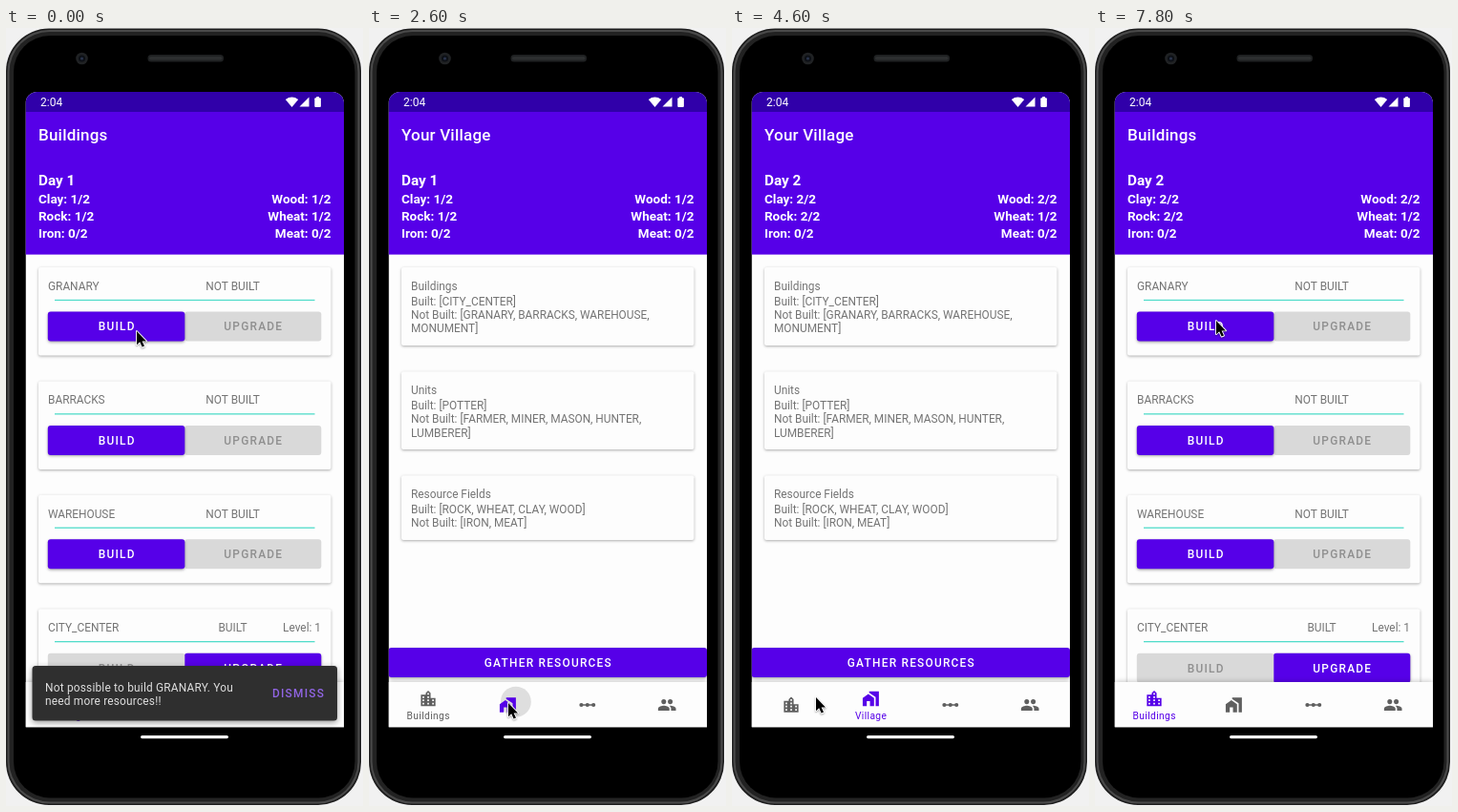
An HTML page with a canvas for the animation above (8 s loop, 374 px wide and 816 px high).

```html
<!DOCTYPE html>
<html lang="en">
<head>
<meta charset="utf-8">
<title>Village builder</title>
<style>
  html, body { margin: 0; width: 100%; height: 100%; overflow: hidden; background: #f1f1f1; }
  canvas { display: block; width: 374px; height: 816px; }
</style>
</head>
<body>
<canvas id="stage"></canvas>
<script>
const LOOP = 8000, STEP = 200;
const DISMISSED = 1400, VILLAGE_TAP = 2600, GATHERED = 3800, BUILDINGS_TAP = 5800;
const PURPLE = '#5600e8', GREY = '#5f5f5f', PAPER = '#fdfdfd', BODY = '#747474';
const LEFT = 20.5, WIDTH = 333.5, TOP = 67, BOTTOM = 733.5;

const canvas = document.getElementById('stage');
const scale = window.devicePixelRatio || 1;
canvas.width = 374 * scale;
canvas.height = 816 * scale;
const ctx = canvas.getContext('2d');

const clamp = v => Math.max(0, Math.min(1, v));
const ease = v => v * v * (3 - 2 * v);
const mix = (a, b, p) => a + (b - a) * p;

function box(x, y, w, h, radius, fill) {
  ctx.beginPath();
  ctx.roundRect(x, y, w, h, radius);
  ctx.fillStyle = fill;
  ctx.fill();
}

function disc(x, y, r, fill) {
  ctx.beginPath();
  ctx.arc(x, y, r, 0, 7);
  ctx.fillStyle = fill;
  ctx.fill();
}

function shadowed(blur, dy, alpha, draw) {
  ctx.save();
  ctx.shadowColor = `rgba(0,0,0,${alpha})`;
  ctx.shadowBlur = blur * scale;
  ctx.shadowOffsetY = dy * scale;
  draw();
  ctx.restore();
}

function text(str, x, y, { size = 11.87, weight = 400, color = BODY, spacing = 0, align = 'left' } = {}) {
  ctx.font = `${weight} ${size}px Roboto, sans-serif`;
  ctx.letterSpacing = spacing + 'px';
  ctx.textAlign = align;
  ctx.fillStyle = color;
  ctx.fillText(str, x + (align === 'left' ? 0 : align === 'center' ? spacing / 2 : spacing), y);
}

function drawPhone() {
  ctx.fillStyle = '#f1f1f1';
  ctx.fillRect(0, 0, 374, 816);
  box(0, 0.5, 372, 814.5, 45, '#1c1c1c');
  box(1.5, 2, 369, 811.5, 44, '#4a4a4a');
  box(3.5, 4, 365, 807.5, 42, '#222');
  box(8, 8, 357.5, 799.5, 38, '#000');
  box(148.5, 28, 79.5, 7.5, 3.5, '#1f2122');
  box(150, 30, 76.5, 3.5, 2, '#2d2f30');
  disc(79.5, 32, 6.3, '#202224');
  disc(79.5, 32, 3.6, '#0d1016');
  disc(79.5, 32, 1.6, '#28324a');
  box(141, 742, 92, 3.2, 1.6, '#f4f4f4');
}

function drawStatusBar() {
  ctx.fillStyle = '#3000a9';
  ctx.fillRect(LEFT, TOP, WIDTH, 21);
  text('2:04', 36, 82, { size: 12, color: '#fff' });
  ctx.fillStyle = '#fff';
  ctx.fill(new Path2D('M299.5 83L292.8 75Q299.5 70.2 306.2 75Z'));
  ctx.fill(new Path2D('M307.5 82.5H317.5V72.5Z'));
  box(323.3, 73.2, 6.6, 9.8, 1, '#fff');
  box(325.2, 72, 2.8, 2, 0, '#fff');
}

function drawHeader(title, gathered) {
  ctx.fillStyle = PURPLE;
  ctx.fillRect(LEFT, 88, WIDTH, 149.6);
  text(title, 34, 118, { size: 17, weight: 500, color: '#fff', spacing: 0.2 });
  const bold = { size: 13.5, weight: 700, color: '#fff' };
  const n = gathered ? 2 : 1;
  text(`Day ${n}`, 34, 165, { ...bold, size: 15.3 });
  [[`Clay: ${n}/2`, `Wood: ${n}/2`], [`Rock: ${n}/2`, 'Wheat: 1/2'], ['Iron: 0/2', 'Meat: 0/2']]
    .forEach(([left, right], i) => {
      const y = 184 + i * 18.2;
      text(left, 34, y, bold);
      text(right, 340.5, y, { ...bold, align: 'right' });
    });
}

function card(y, h) {
  shadowed(3, 1, 0.32, () => box(34, y, 306.5, h, 2, PAPER));
}

function button(label, x, y, w, h, enabled) {
  const draw = () => box(x, y, w, h, 3, enabled ? PURPLE : '#d9d9d9');
  enabled ? shadowed(3, 1.2, 0.35, draw) : draw();
  text(label, x + w / 2, y + h / 2 + 4.3,
    { size: 11.87, weight: 500, spacing: 1.25, align: 'center', color: enabled ? '#fff' : '#8f8f8f' });
}

function drawBuildings() {
  ['GRANARY', 'BARRACKS', 'WAREHOUSE', 'CITY_CENTER'].forEach((name, i) => {
    const y = 251 + i * 119.4, built = i === 3;
    card(y, 92.5);
    text(name, 44, y + 24);
    text(built ? 'BUILT' : 'NOT BUILT', 237.5, y + 24, { align: 'center' });
    if (built) text('Level: 1', 330, y + 24, { align: 'right' });
    ctx.fillStyle = '#52dcca';
    ctx.fillRect(51, y + 33.8, 272.5, 1.3);
    button('UPGRADE', 187, y + 46.5, 143.3, 31, built);
    button('BUILD', 43.8, y + 46.5, 143.5, 31, !built);
  });
}

function drawVillage() {
  const sections = [
    [251, 82, 'Buildings', 'Built: [CITY_CENTER]', 'Not Built: [GRANARY, BARRACKS, WAREHOUSE,', 'MONUMENT]'],
    [360.3, 81.7, 'Units', 'Built: [POTTER]', 'Not Built: [FARMER, MINER, MASON, HUNTER,', 'LUMBERER]'],
    [469.3, 67.7, 'Resource Fields', 'Built: [ROCK, WHEAT, CLAY, WOOD]', 'Not Built: [IRON, MEAT]']
  ];
  for (const [y, h, title, ...lines] of sections) {
    card(y, h);
    text(title, 44, y + 23.8);
    lines.forEach((line, i) => text(line, 44, y + 40 + i * 14.1));
  }
  button('GATHER RESOURCES', LEFT, 650, WIDTH, 31, true);
}

// Icon shapes live on a 24-unit grid.
const holes = corners => corners.map(([x, y]) => `M${x} ${y}v2h2v-2z`).join('');
const circle = (x, y, r) => `M${x - r} ${y}a${r} ${r} 0 0 1 ${2 * r} 0a${r} ${r} 0 0 1 ${-2 * r} 0z`;
const icons = [
  'M15 11V5l-3-3-3 3v2H3v14h18V11z' +
    holes([[5, 9], [5, 13], [5, 17], [11, 5], [11, 9], [11, 13], [11, 17], [17, 13], [17, 17]]),
  'M2 21V11l7-5 7 5v10h-5v-6H7v6zM10 3h12v18h-4V10l-8-5.5z',
  'M4 11h16v2H4z' + [4.5, 12, 19.5].map(x => circle(x, 12, 2.5)).join(''),
  circle(8, 8, 3) + circle(16, 8, 3) +
    'M8 13c-2.3 0-7 1.2-7 3.5V19h14v-2.5c0-2.3-4.7-3.5-7-3.5z' +
    'M16 13l-1 .1c1.2.8 2 1.9 2 3.4V19h6v-2.5c0-2.3-4.7-3.5-7-3.5z'
].map(d => new Path2D(d));
const labels = ['Buildings', 'Village'];
const tabX = i => 62 + i * 83.4;

function drawNav(active, age) {
  shadowed(5, -1, 0.2, () => box(LEFT, 686, WIDTH, BOTTOM - 686, 0, PAPER));
  const moved = clamp(age / STEP);
  if (age < 800) {
    const grown = ease(clamp((age + 120) / 480));
    ctx.save();
    ctx.beginPath();
    ctx.rect(LEFT, 686, WIDTH, BOTTOM - 686);
    ctx.clip();
    disc(mix(tabX(active) + 10, tabX(active), grown), mix(706, 710, grown), mix(10, 48, grown), 'rgba(0,0,0,.12)');
    ctx.restore();
  }
  icons.forEach((path, i) => {
    const selected = i === active;
    const lift = i > 1 ? 0 : selected ? moved : 1 - moved;
    ctx.save();
    ctx.translate(tabX(i), mix(710, 703.5, lift));
    ctx.scale(0.848, 0.848);
    ctx.translate(-12, -12);
    ctx.fillStyle = selected ? PURPLE : GREY;
    ctx.fill(path, i ? 'nonzero' : 'evenodd');
    ctx.restore();
    if (lift > 0) text(labels[i], tabX(i), 725,
      { size: 10.2, spacing: 0.4, align: 'center', color: selected ? PURPLE : GREY });
  });
}

function drawSnackbar() {
  shadowed(6, 2, 0.4, () => box(27.5, 669, 319.5, 57.5, 3.5, '#2f2f2f'));
  const style = { spacing: 0.21, color: '#dedede' };
  text('Not possible to build GRANARY. You', 41, 695.5, style);
  text('need more resources!!', 41, 709.6, style);
  text('DISMISS', 279, 702.4, { weight: 500, spacing: 1.25, color: '#9165e4' });
}

const pointerPath = [
  [0, 137, 318], [200, 137, 318], [1000, 301, 689], [1800, 301, 689], [2400, 146, 708], [2700, 146, 708],
  [3200, 149, 673], [3400, 155, 663], [3900, 155, 663], [4600, 88, 702], [5000, 76, 709], [5900, 76, 709],
  [6400, 105, 402], [6900, 127, 307], [8000, 127, 307]
];
const arrow = new Path2D('M0 0V14.2L3.2 11.2L5.6 16.6L8 15.6L5.6 10.4H10Z');

function drawPointer(t) {
  const i = pointerPath.findIndex(p => p[0] > t);
  const [t0, x0, y0] = pointerPath[i - 1], [t1, x1, y1] = pointerPath[i];
  const p = ease((t - t0) / (t1 - t0));
  ctx.save();
  ctx.translate(mix(x0, x1, p), mix(y0, y1, p));
  ctx.lineWidth = 1.8;
  ctx.lineJoin = 'round';
  ctx.strokeStyle = '#fff';
  shadowed(2, 1, 0.35, () => ctx.stroke(arrow));
  ctx.fillStyle = '#000';
  ctx.fill(arrow);
  ctx.restore();
}

function draw(t) {
  ctx.setTransform(scale, 0, 0, scale, 0, 0);
  drawPhone();
  const inVillage = t >= VILLAGE_TAP && t < BUILDINGS_TAP;
  const tapAge = t >= BUILDINGS_TAP ? t - BUILDINGS_TAP : inVillage ? t - VILLAGE_TAP : LOOP;

  ctx.save();
  ctx.beginPath();
  ctx.roundRect(LEFT, TOP, WIDTH, BOTTOM - TOP, [12, 12, 0, 0]);
  ctx.clip();
  ctx.fillStyle = PAPER;
  ctx.fillRect(LEFT, TOP, WIDTH, BOTTOM - TOP);
  drawStatusBar();
  drawHeader(inVillage ? 'Your Village' : 'Buildings', t >= GATHERED);
  inVillage ? drawVillage() : drawBuildings();
  drawNav(inVillage ? 1 : 0, tapAge);
  if (t < DISMISSED) drawSnackbar();
  ctx.restore();

  drawPointer(t);
}

function tick() {
  draw(Math.floor((performance.now() % LOOP) / STEP) * STEP);
  requestAnimationFrame(tick);
}
tick();
</script>
</body>
</html>
```
